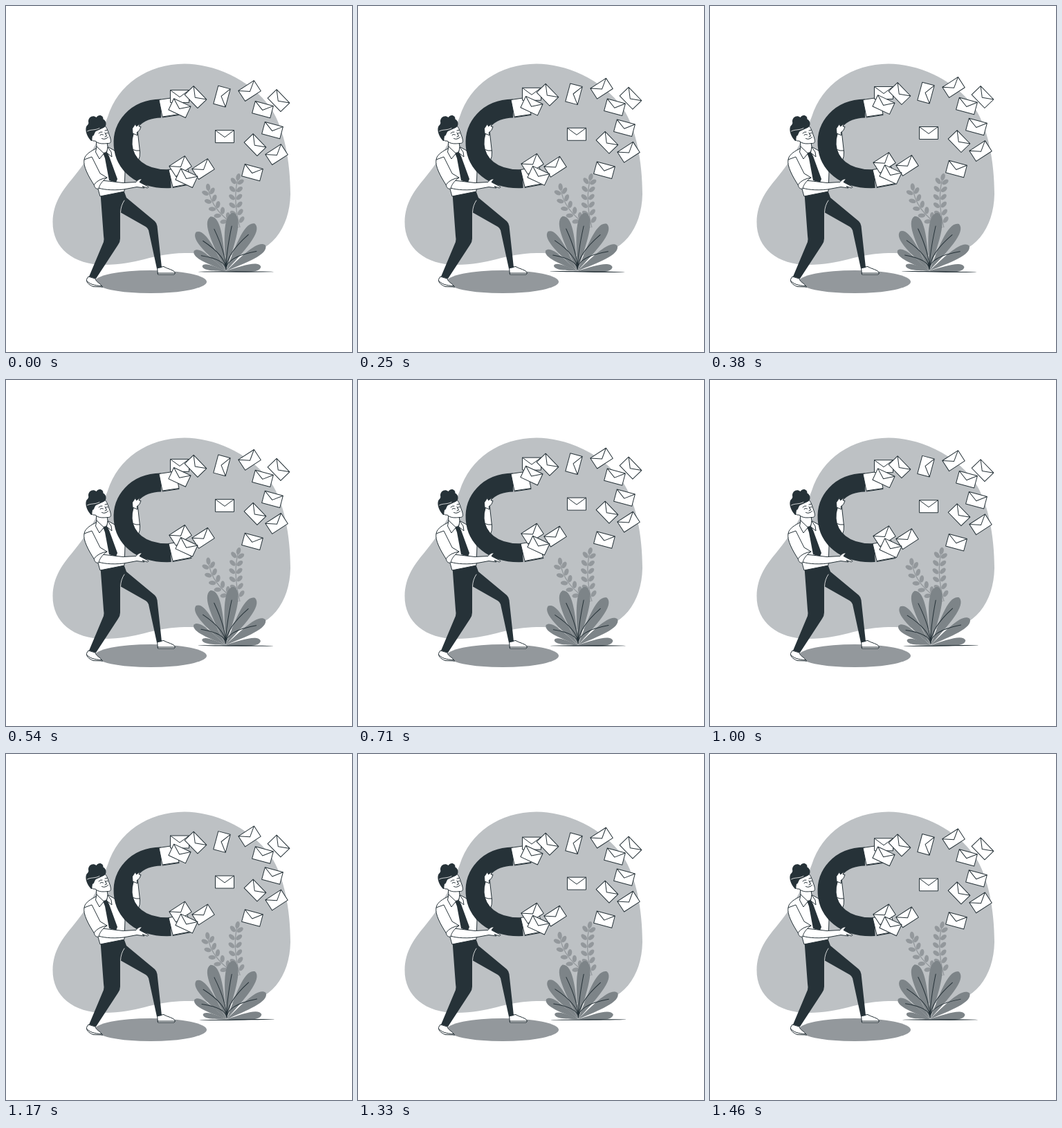
Recreate the animation shown at these times as an HTML page. Size 500 by 500 pixels, loop 1500 ms.

```html
<!DOCTYPE html>
<html lang="en">
<head>
<meta charset="utf-8">
<title>Mail magnet</title>
<style>
  html, body { margin: 0; width: 100%; height: 100%; overflow: hidden; background: #fff; }
  svg { display: block; width: 100%; height: 100%; }
  .ink { fill: #263238; }
  .paper { fill: #fff; stroke: #263238; stroke-width: 1; stroke-linejoin: round; }
  .line { fill: none; stroke: #263238; stroke-width: 1; stroke-linecap: round; stroke-linejoin: round; }
  .light { fill: none; stroke: #fff; stroke-width: .8; stroke-linecap: round; }
  .magnet { fill: none; stroke: #263238; stroke-width: 27; }
  .blob { fill: #bdc1c4; }
  .shade { fill: #93989c; }
  .leaf { fill: #7d8488; }
  .stem { fill: none; stroke: #93989c; stroke-width: 1.3; }
</style>
</head>
<body>
<svg viewBox="0 0 500 500">
  <path class="blob" d="M258 83.5C298 83.5 352 104 383 148C402 177 411 225 411 272C410 322 382 359 335 360C300 361 290 357 258 357C210 358 190 374 142 374C98 374 67 350 67.500 312C68 284 82 266 97 248C118 222 132 200 147 160C162 113 205 84 258 83.500Z"/>
  <ellipse class="shade" cx="209" cy="398.5" rx="81" ry="16.5"/>

  <g id="plant"></g>

  <g id="legs">
    <path class="paper" d="M218.500 378L228 376.500C233 380 243 381 244.500 386L243 388L219.500 388Z"/>
    <path class="line" d="M219 386H244"/>
    <path class="paper" d="M119 391L129 394C130 399 137 401 139.500 406L126 405.500C119 403 115 398 117 394Z"/>
    <path class="line" d="M116.500 397C121 402 127 404 138 404.500"/>
    <path class="ink" d="M136.500 271L170 266L174 277L215 311Q218 314 218.500 318L225 378L218 379.500L206 324Q205 321 202 319L165 298L165 336Q165 341 162 345L130 394L120 391L141 341Q142 337 141 332Z"/>
    <path class="light" d="M171 281Q166 288 165.500 298"/>
  </g>

  <g id="torso">
    <path class="paper" d="M132 205C124 209 114 214 113 222L130 254L136 275L171 268L172 240L157 209L148 204Z"/>
    <path class="paper" d="M130 193L131.500 208L142 215L147.500 207L146 197Z"/>
    <path class="ink" d="M140 212L146 211L149 217L161 250L159 255L149 252L143 220Z"/>
    <path class="paper" d="M131 203L129.500 211L135 221L141.500 213Z"/>
    <path class="paper" d="M147 204L152 211L153 218L145.500 212Z"/>
  </g>

  <g id="head">
    <path class="paper" d="M122 185C126 179 134 178 143 173C147 177 148 184 150.500 190C152.500 197 151.500 198.500 147 198.500C141 199 134 200 129 195C123 196 121 190 125 187Z"/>
    <path class="ink" d="M123 195C117 189 114 180 116 174.500C118 171 120 171 119 167C119 160 126 157 130.500 161C134 155.500 141 158 140.500 163.500C146 166 146 175 140 176.500L130 181C127 184 128 187 125 188L124 195Z"/>
    <path class="light" d="M117.500 181C122 178 129 180 135 176.500"/>
    <path class="line" d="M134 184Q136 181.500 139 182M143 180L146 179.500M136 186.500Q138 184.500 140.500 186M144 184.500Q145.500 183 147 183.500M143 183L145.500 188L143 189M138.500 191.500Q143 194 147.500 189.500"/>
  </g>

  <path class="paper" d="M183 178L190 179L193.500 211Q194 225 186 226L180 222Z"/>
  <path class="line" d="M182 207Q188 210 193.500 209"/>

  <g id="magnet">
    <path class="magnet" d="M224 148C149 149 148 254 238 249.500"/>
    <path class="paper" d="M221 135.500L245 132L250 156.500L226 160Z"/>
    <path class="paper" d="M235 236.500L262 232L267.500 256.500L241 261.500Z"/>
    <path class="line" d="M226 161L250 157.500M241 262.500L268 257.500"/>
  </g>
  <path class="paper" d="M183 184L182.500 177L187 170.500L188.500 174L193.500 170L192 174L195 174.500L193 179.500L189 183L190 187Z"/>

  <g id="near-arm">
    <path class="paper" d="M130 251L169 255.500L188 254.500C190 251 195 249 196 250.500L193 254.500L206 261.500L204.500 263L197 260.500L200 263L189 261.500L170 265C152 267 138 265 131 262Z"/>
    <path class="paper" d="M113 222C111 231 119 246 127.500 259C128 263 131 265 134 264C135 258 140 252 146 248L136 242L124 218Z"/>
    <path class="line" d="M127.500 258Q133 250 146 248"/>
  </g>

  <g id="mail"></g>
</svg>
<script>
const LOOP = 1500, PHASE = 30;
const plant = document.getElementById('plant');
const mail = document.getElementById('mail');

function add(parent, tag, attrs) {
  const node = document.createElementNS('http://www.w3.org/2000/svg', tag);
  for (const key in attrs) node.setAttribute(key, attrs[key]);
  parent.append(node);
  return node;
}

// Curved stem with paired leaflets spaced evenly down from its tip
function sprig(d, pairs) {
  const stem = add(plant, 'path', { class: 'stem', d });
  const step = stem.getTotalLength() / (pairs + .5);
  const leaflet = (at, turn, reach) => {
    const a = stem.getPointAtLength(at), b = stem.getPointAtLength(at + 1);
    const angle = Math.atan2(a.y - b.y, a.x - b.x) * 180 / Math.PI + turn;
    add(plant, 'ellipse', {
      class: 'shade', cx: reach, rx: 5.2, ry: 3.1,
      transform: `translate(${a.x} ${a.y}) rotate(${angle})`
    });
  };
  leaflet(0, 0, 0);
  for (let i = 1; i <= pairs; i++) {
    leaflet(i * step, -48, 7);
    leaflet(i * step, 48, 7);
  }
}

// Fan of leaves from one foot: longest in the middle, shortest at the sides
function fan(x, y, count) {
  let veins = '';
  for (let i = 0; i < count; i++) {
    const angle = (23 * i - 78 - 7 * Math.sin(Math.PI * i / (count - 1))) * Math.PI / 180;
    const length = 35 + 50 * Math.sin(Math.PI * i / (count - .2));
    const width = length * .14;
    const point = (along, side) => {
      const u = along * length, v = side * width;
      return `${x + u * Math.sin(angle) + v * Math.cos(angle)} ${y - u * Math.cos(angle) + v * Math.sin(angle)}`;
    };
    add(plant, 'path', {
      class: 'leaf',
      d: `M${x} ${y}C${point(.45, .6)} ${point(.95, 1.4)} ${point(1, 0)}C${point(.95, -1.4)} ${point(.45, -.6)} ${x} ${y}`
    });
    if (i && i < count - 1) veins += `M${x} ${y - 2}Q${x} ${y - length * .3} ${point(.77, 0)}`;
  }
  add(plant, 'path', { class: 'line', d: veins });
}

sprig('M292 262Q296 297 336 320', 6);
sprig('M335.500 247Q327 278 338 320', 6);
fan(318, 383, 8);
add(plant, 'ellipse', { class: 'ink', cx: 332.5, cy: 384, rx: 54.5, ry: .7 });

// Envelope centres grouped by tilt, back to front
const envelopes = [
  [0, '251,131 316,189'],
  [-33, '252,232 285,236 352,123 391,215'],
  [15, '371,150 385,180 356,241'],
  [25, '251,148 261,249'],
  [46, '274,132 394,137 360,201'],
  [105, '312,131']
];
for (const [tilt, centres] of envelopes) {
  for (const centre of centres.split(' ')) {
    add(mail, 'path', {
      class: 'paper',
      d: 'M13.500 -9L0 1L-13.500 -9H13.500V9H-13.500V-9',
      transform: `translate(${centre}) rotate(${tilt})`
    });
  }
}

// Triangle wave from 0 up to 1 and back
const wave = p => 1 - Math.abs(1 - 2 * (p % 1));

function draw(time) {
  const p = (time + PHASE) / LOOP;
  mail.setAttribute('transform', `translate(0 ${-10 * wave(p)})`);
  plant.setAttribute('transform', `rotate(${2 * wave(p + .25) - 1} 332.5 313)`);
}

let start;
function tick(now) {
  start ??= now;
  draw(now - start);
  requestAnimationFrame(tick);
}
draw(0);
requestAnimationFrame(tick);
</script>
</body>
</html>
```
